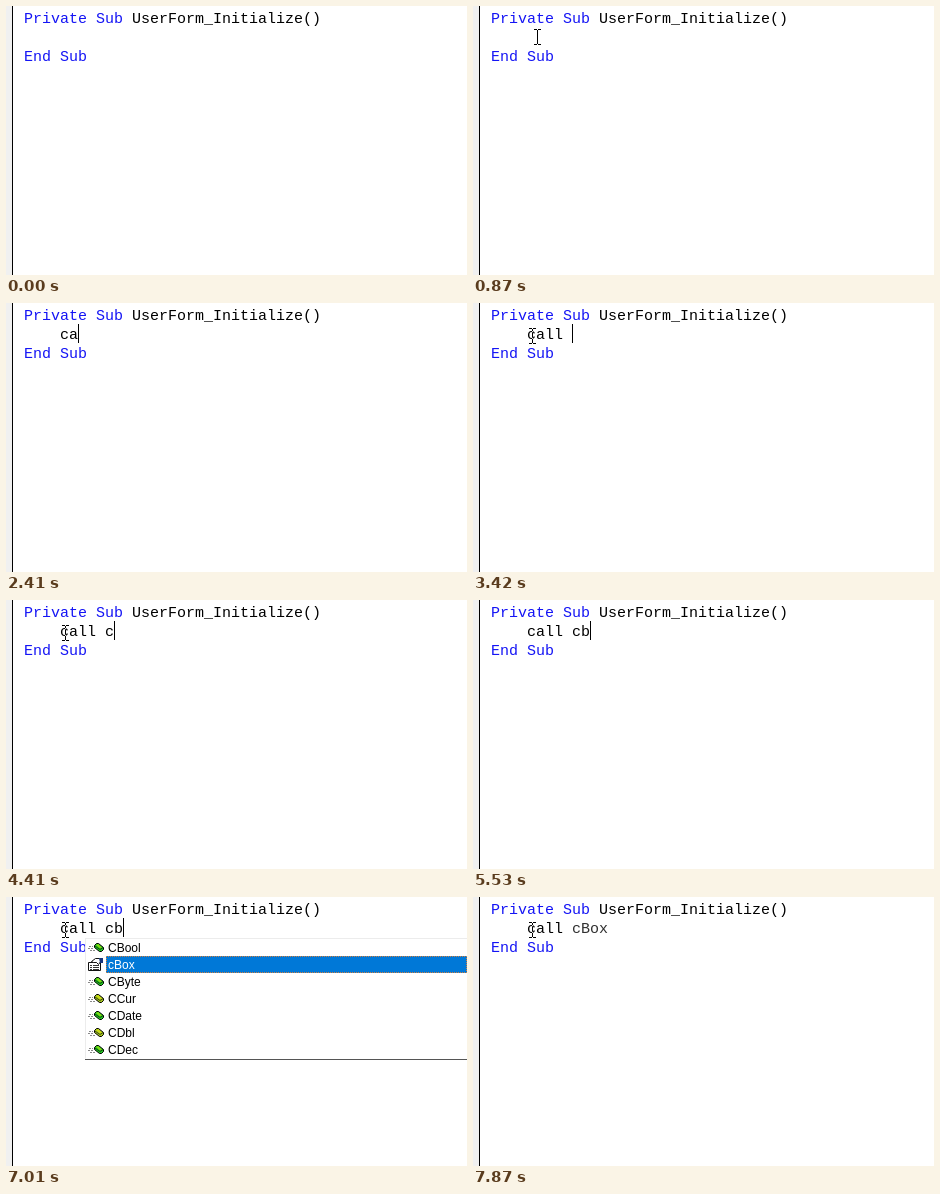
Write an HTML page that moves like this. It is 461 px wide and 269 px high and loops after 8000 ms.

```html
<!DOCTYPE html>
<html lang="en">
<head>
<meta charset="utf-8">
<title>Code editor typing</title>
<style>
  html, body { margin: 0; width: 100%; height: 100%; overflow: hidden; background: #fff; }
  #stage {
    position: relative; width: 461px; height: 269px; overflow: hidden; background: #fff;
    font: 15px/19px "Liberation Mono", monospace; color: #000; isolation: isolate;
  }
  #stage > * { position: absolute; }
  .margin { left: 0; top: 0; width: 6px; height: 100%; background: #f0f0f0; border-right: 1px solid #000; }
  .line { white-space: pre; overflow: hidden; height: 19px; left: 18px; }
  .line b { font-weight: normal; color: #1414f5; }

  .typed, .picked, .caret, .mouse, .list, .first, .second {
    animation: 8s step-end infinite;
  }
  .typed { left: 54px; top: 23px; animation-name: type; }
  .picked { left: 99px; top: 23px; color: #303030; animation-name: insert; }
  .caret { left: 0; top: 21px; width: 1px; height: 19px; background: #000; animation-name: advance, blink; }
  .mouse { left: 56px; top: 25px; mix-blend-mode: difference; animation-name: roam, hide; }

  .list {
    left: 79px; top: 41px; width: 400px; height: 119px; background: #fff;
    border: 1px solid #ececec; border-bottom-color: #fff; box-shadow: 0 1px #555;
    font: 12px/19px "Liberation Sans", sans-serif; animation-name: popup;
  }
  .row { position: relative; height: 17px; }
  .row svg { position: absolute; left: 2px; top: 0; }
  .row span {
    position: absolute; left: 20px; width: 361px; height: 17px; box-sizing: border-box;
    padding-left: 2px; outline: 1px dotted transparent; outline-offset: -1px;
  }
  .first { animation-name: leave; }
  .second { animation-name: enter; }

  @keyframes type {
    0% { width: 0; }
    24.375% { width: 9px; }
    29% { width: 18px; }
    30.375% { width: 27px; }
    31.75% { width: 36px; }
    42.75% { width: 45px; }
    51.875% { width: 54px; }
    69.125% { width: 63px; }
    90.875%, 100% { width: 45px; }
  }
  @keyframes insert {
    0% { opacity: 0; }
    90.875%, 100% { opacity: 1; }
  }
  @keyframes advance {
    0% { translate: 54px 0; }
    24.375% { translate: 63px 0; }
    29% { translate: 72px 0; }
    30.375% { translate: 81px 0; }
    31.75% { translate: 90px 0; }
    42.75% { translate: 99px 0; }
    51.875% { translate: 108px 0; }
    69.125% { translate: 117px 0; }
    90.875%, 100% { translate: 135px 0; }
  }
  @keyframes blink {
    0%, 20%, 38.375%, 49.375%, 58.375%, 76%, 89.25%, 98.375%, 100% { opacity: 0; }
    13.375%, 24.375%, 42.75%, 51.875%, 65%, 82.625%, 90.875% { opacity: 1; }
  }
  @keyframes roam {
    0%, 0.875% { translate: 191px 161px; }
    1.675% { translate: 128px 118px; }
    2.475% { translate: 62px 70px; }
    3.275% { translate: 10px 28px; }
    4.075% { translate: -18px 4px; }
    4.875% { translate: -11px -5px; }
    8.25% { translate: -8px -6px; }
    9.3125% { translate: -1px -5px; }
    10.375% { translate: 5px -2px; }
    11.4375% { translate: 6px 1px; }
    12.5% { translate: 5px 2px; }
    14.625% { translate: 3px 2px; }
    15.6875% { translate: 1px 1px; }
    16.75%, 100% { translate: 0 0; }
  }
  @keyframes hide {
    0%, 24.375%, 29%, 51.875%, 69.125%, 90.875% { opacity: 0; }
    0.875%, 27.625%, 36.75%, 55.125%, 73.5%, 91.75%, 100% { opacity: 1; }
  }
  @keyframes popup {
    0%, 90.875%, 100% { opacity: 0; }
    73.5% { opacity: 1; }
  }
  @keyframes leave {
    0% { background: #0078d7; color: #fff; outline-color: #d08040; }
    87.625%, 100% { background: #fff; color: #000; outline-color: transparent; }
  }
  @keyframes enter {
    0% { background: #fff; color: #000; outline-color: transparent; }
    87.625%, 100% { background: #0078d7; color: #fff; outline-color: #d08040; }
  }
</style>
</head>
<body>
<div id="stage">
  <div class="margin"></div>
  <div class="line" style="top:4px"><b>Private Sub</b> UserForm_Initialize()</div>
  <div class="line" style="top:42px"><b>End Sub</b></div>
  <div class="line typed">call cb</div>
  <div class="line picked">cBox</div>
  <div class="caret"></div>

  <svg width="0" height="0">
    <symbol id="method" viewBox="0 0 17 17">
      <path d="M1 7.5h4M0 9.5h6M2 11.5h6" stroke="#888" stroke-dasharray="2 1"/>
      <path d="M6.500 6.500l2-2h2l5 4v2l-2 2h-2l-5-4z" fill="currentColor" stroke="#000"/>
      <path d="M8 6l2-1 4 3.500-2 1z" fill="#ff0" opacity=".45"/>
      <path d="M7 7l5 3.500 3-2" fill="none" stroke="#000" opacity=".6"/>
    </symbol>
    <symbol id="property" viewBox="0 0 17 17">
      <path d="M.5 6.500h12v8H.5z" fill="#fff" stroke="#111"/>
      <path d="M2 9.500h2m1 0h6M2 11.500h2m1 0h6M2 13.500h2m1 0h6" stroke="#333"/>
      <path d="M3.500 5.500l4-3h4l2 2-3 4-2-2h-3z" fill="#fff" stroke="#111"/>
      <path d="M11 2h4v5h-3z" fill="#19357c"/>
    </symbol>
  </svg>

  <div class="list">
    <div class="row"><svg width="17" height="17" color="#20c020"><use href="#method"/></svg><span class="first">CBool</span></div>
    <div class="row"><svg width="17" height="17"><use href="#property"/></svg><span class="second">cBox</span></div>
    <div class="row"><svg width="17" height="17" color="#20c020"><use href="#method"/></svg><span>CByte</span></div>
    <div class="row"><svg width="17" height="17" color="#a0c020"><use href="#method"/></svg><span>CCur</span></div>
    <div class="row"><svg width="17" height="17" color="#20c020"><use href="#method"/></svg><span>CDate</span></div>
    <div class="row"><svg width="17" height="17" color="#a0c020"><use href="#method"/></svg><span>CDbl</span></div>
    <div class="row"><svg width="17" height="17" color="#20c020"><use href="#method"/></svg><span>CDec</span></div>
  </div>

  <svg class="mouse" width="7" height="16" shape-rendering="crispEdges">
    <path d="M0 .5h3m1 0h3M3.500 1v14M0 15.500h3m1 0h3" stroke="#fff" fill="none"/>
  </svg>
</div>
</body>
</html>
```
